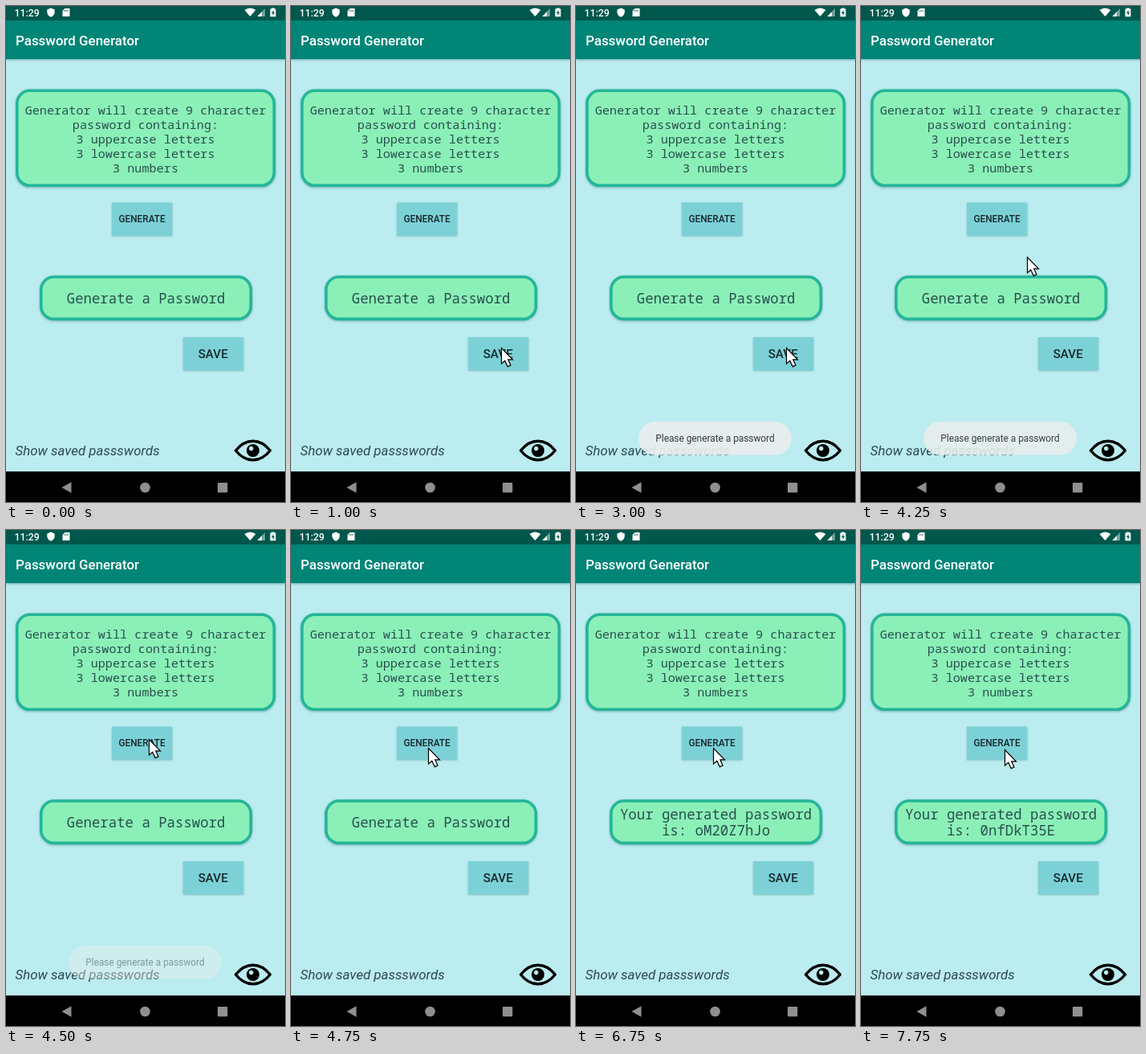
An HTML page for the animation above (8 s loop, 348x617 px).

```html
<!DOCTYPE html>
<html lang="en">
<head>
<meta charset="utf-8">
<title>Password Generator</title>
<style>
html, body { margin: 0; width: 100%; height: 100%; overflow: hidden; background: #bbecef; }
svg { display: block; width: 348px; height: 617px; }
text { font-family: Roboto, sans-serif; }
.mono { font-family: "Noto Sans Mono", "DejaVu Sans Mono", monospace; fill: #28504f; text-anchor: middle; }
.info { font-size: 15.2px; }
.result { font-size: 17.35px; }
.label { font-weight: 500; fill: #16282b; text-anchor: middle; }
.card { fill: #8bf0b7; stroke: #23b698; stroke-width: 3.6; filter: drop-shadow(0 1.5px 1.5px rgba(0, 60, 70, .32)); }
.button { fill: #7cd1d7; filter: drop-shadow(0 1px 1px rgba(0, 60, 70, .28)); }
.button.raised { filter: drop-shadow(0 2px 2px rgba(0, 60, 70, .4)); }
</style>
</head>
<body>
<svg viewBox="0 0 348 617">
  <rect width="348" height="617" fill="#bbecef"/>

  <rect y="18" width="348" height="48" fill="#008577" style="filter:drop-shadow(0 1px 1.5px rgba(0,60,70,.4))"/>
  <rect width="348" height="18" fill="#00574b"/>
  <text x="12" y="48.5" font-size="16.92" font-weight="500" fill="#fff">Password Generator</text>

  <g fill="#fff">
    <text x="10.5" y="13" font-size="12.3" font-weight="500">11:29</text>
    <path d="M56 2.5L60.7 4.5V8Q60.3 12 56 13.7Q51.7 12 51.3 8V4.5Z"/>
    <path d="M73.5 3H79.5V13H70.5V6Z"/>
    <path d="M297.5 5Q304.5 0 311.5 5L304.5 13Z"/>
    <path d="M313.5 13L323 3V13Z" opacity=".45"/>
    <path d="M313.5 13L319 7.2V13Z"/>
    <path d="M331.3 2.5H334.7V3.6H336.5V13.3H329.5V3.6H331.3Z"/>
  </g>
  <path d="M333.8 5L331 9H332.7V12L335.2 8H333.5Z" fill="#00574b"/>
  <path d="M73 5V7M75 5V7M77 5V7" stroke="#00574b" stroke-width=".8"/>

  <rect class="card" x="13.8" y="105.3" width="320.6" height="118" rx="16"/>
  <g id="info"></g>

  <rect class="button" id="make" x="132" y="244.5" width="75.3" height="41"/>
  <rect id="ripple" x="132" y="244.5" width="75.3" height="41" fill="#04363c" opacity="0"/>
  <text class="label" x="169.6" y="269.4" font-size="11.85">GENERATE</text>

  <rect class="card" x="43.8" y="337" width="261.6" height="52.4" rx="16"/>
  <text class="mono result" id="line1" x="174.6"></text>
  <text class="mono result" id="line2" x="174.6" y="380"></text>

  <rect class="button" id="save" x="221" y="412" width="75.2" height="41"/>
  <text class="label" x="258.2" y="438.2" font-size="15.2">SAVE</text>

  <text x="11.5" y="558.5" font-size="16.92" font-style="italic" fill="#2d4a50">Show saved passswords</text>

  <g transform="translate(308 553)">
    <path d="M-21.5 0Q-12 -11.8 0 -11.8T21.5 0Q12 11.8 0 11.8T-21.5 0Z" fill="none" stroke="#000" stroke-width="3.4" stroke-linejoin="round"/>
    <circle r="8"/>
    <circle cx="-2.2" cy="-2.5" r="2.7" fill="#bbecef"/>
  </g>

  <g id="toast" opacity="0">
    <rect x="78" y="517" width="191" height="41.5" rx="20.5" fill="#e9eeee" opacity=".92"/>
    <text x="173.5" y="542.2" font-size="11.85" text-anchor="middle" fill="#343b3c">Please generate a password</text>
  </g>

  <rect y="579" width="348" height="38"/>
  <g fill="#8f8f8f">
    <path d="M69.5 599L81.5 592.3V605.7Z"/>
    <circle cx="173.5" cy="599" r="6.3"/>
    <rect x="264" y="593" width="12.3" height="12.3" rx="1"/>
  </g>

  <path id="cursor" d="M.5 .5V20L4.8 16.2L8.3 23.6L12 22L8.8 14.8H14.5Z" fill="#fff" stroke="#000" stroke-width="1.2" stroke-linejoin="miter"/>
</svg>
<script>
const LOOP = 8000;
const $ = id => document.getElementById(id);

// Each track lists [start ms, value]; a value holds until the next one.
const tracks = {
  cursor: [[0, null], [500, [220, 609]], [750, [267, 457]], [1000, [262, 425]],
    [4000, [265, 390]], [4250, [207, 312]], [4500, [178, 260]],
    [4750, [171, 271]], [7750, [179, 273]]],
  toast: [[0, 0], [2500, .35], [2750, .8], [3000, 1], [4250, .97], [4500, .45], [4750, 0]],
  password: [[0, ""], [5250, "w4KtR81bQ"], [6500, "oM20Z7hJo"], [7500, "0nfDkT35E"]],
  saveDown: [[0, false], [2250, true], [2500, false]],
  makeDown: [[0, false], [5250, true], [5500, false], [6500, true], [6750, false],
    [7500, true], [7750, false]]
};

const valueAt = (track, t) => track.filter(([start]) => start <= t).pop()[1];

const info = ["Generator will create 9 character", "password containing:",
  "3 uppercase letters", "3 lowercase letters", "3 numbers"];
$("info").innerHTML = info.map((line, i) =>
  `<text class="mono info" x="174" y="${135.3 + i * 17.85}">${line}</text>`).join("");

function draw(t) {
  const now = {};
  for (const name in tracks) now[name] = valueAt(tracks[name], t);

  $("cursor").setAttribute("visibility", now.cursor ? "visible" : "hidden");
  if (now.cursor) $("cursor").setAttribute("transform", `translate(${now.cursor})`);

  $("toast").setAttribute("opacity", now.toast);
  $("save").classList.toggle("raised", now.saveDown);
  $("make").classList.toggle("raised", now.makeDown);
  $("ripple").setAttribute("opacity", now.makeDown ? .08 : 0);

  $("line1").textContent = now.password ? "Your generated password" : "Generate a Password";
  $("line1").setAttribute("y", now.password ? 360 : 370);
  $("line2").textContent = now.password ? "is: " + now.password : "";
}

const begin = performance.now();
function tick() {
  draw((performance.now() - begin) % LOOP);
  requestAnimationFrame(tick);
}
tick();
</script>
</body>
</html>
```
